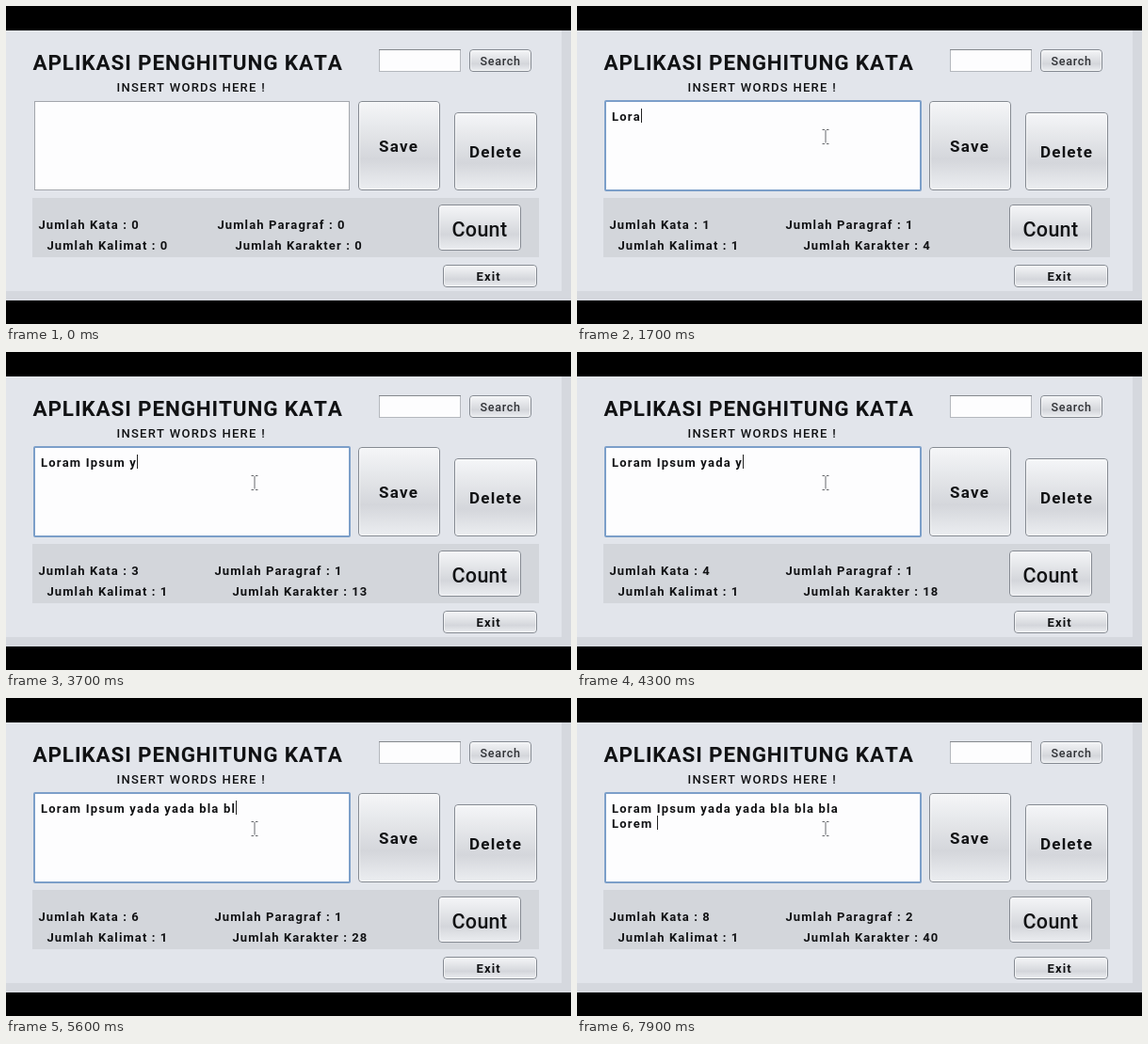
These frames come from a looping animation (600x338 px, 8 s). An HTML page:

```html
<!DOCTYPE html>
<html lang="id">
<head>
<meta charset="utf-8">
<title>Aplikasi Penghitung Kata</title>
<style>
  html, body { margin: 0; height: 100%; overflow: hidden; background: #000; }
  svg { display: block; width: 100vw; height: 100vh; }
  text {
    font: 700 13px Roboto, "Open Sans", sans-serif;
    font-kerning: none;
    letter-spacing: 1.1px;
    fill: #111214;
  }
  .title { font-size: 22.5px; letter-spacing: .85px; }
  .hint { font-weight: 500; letter-spacing: 1.27px; }
  .search { font-size: 12.5px; font-weight: 500; letter-spacing: .7px; fill: #303236; }
  .big { font-size: 17px; letter-spacing: 1.2px; }
  .count { font-size: 21.5px; font-weight: 500; letter-spacing: .3px; }
  .typed { letter-spacing: 1.18px; }
  .button { fill: url(#face); stroke: #858a92; }
  .shade { fill: none; stroke: #fff; stroke-opacity: .55; }
</style>
</head>
<body>
<svg viewBox="0 0 600 338" preserveAspectRatio="none">
  <defs>
    <linearGradient id="face" x2="0" y2="1">
      <stop offset="0" stop-color="#f5f6f8"/>
      <stop offset=".5" stop-color="#dcdee2"/>
      <stop offset=".65" stop-color="#d4d6db"/>
      <stop offset="1" stop-color="#eceef1"/>
    </linearGradient>
  </defs>

  <path fill="#d5d8de" d="M0 26H600V313H0z"/>
  <path fill="#e2e5eb" d="M0 26H590V303H0z"/>
  <path fill="#d3d6db" d="M28 204H566V267H28z"/>

  <text class="title" x="28.5" y="67.5">APLIKASI PENGHITUNG KATA</text>
  <text class="hint" x="117.5" y="91">INSERT WORDS HERE !</text>

  <rect x="396.5" y="46.5" width="86" height="23" fill="#fdfdfe" stroke="#b4b7bd"/>
  <path stroke="#85888d" d="M396 46.5H483"/>

  <g id="buttons"></g>
  <text class="search" x="503.5" y="63">Search</text>
  <text class="big" x="396" y="155">Save</text>
  <text class="big" x="492" y="160.5">Delete</text>
  <text class="count" x="473.5" y="244.5">Count</text>
  <text x="499.5" y="292">Exit</text>

  <rect x="30.5" y="101.5" width="334" height="94" fill="#fdfdfe" stroke="#a3a6ac"/>
  <rect id="focus" x="30" y="101" width="335" height="95" rx="1" fill="none" stroke="#7c9fc9" stroke-width="2"/>
  <text class="typed" x="37" y="121.5" xml:space="preserve"></text>
  <text class="typed" x="37" y="137.5" xml:space="preserve"></text>
  <path id="caret" stroke="#222" d="M.5 0V15"/>
  <path id="pointer" fill="none" stroke="#66686c" d="M260.5 131.5H263M265 131.5H267.5M264 132V145.5M260.5 146.5H263M265 146.5H267.5"/>

  <text id="words" x="34.5" y="237"></text>
  <text id="paragraphs" y="237"></text>
  <text id="sentences" x="43.5" y="259"></text>
  <text id="characters" y="259"></text>
</svg>
<script>
  const LOOP = 8000, BLINK = 500, FOCUS_AT = 400, POINTER_AT = 200;
  const MESSAGE = "Loram Ipsum yada yada bla bla bla\nLorem ";
  // Moment of each keystroke, in tenths of a second
  const KEYS = [13, 14, 16, 17, 18, 20, 24, 26, 28, 30, 32, 34, 36, 38, 39, 40, 41, 43, 44, 45,
    46, 47, 48, 49, 50, 52, 53, 55, 57, 58, 59, 60, 61, 64, 71, 72, 74, 75, 76, 78];
  const BUTTONS = [[492, 46, 66, 24], [374, 101, 87, 95], [476, 113, 88, 83], [459, 211, 88, 49], [464, 275, 100, 24]];

  const $ = id => document.getElementById(id);
  const lineNodes = document.querySelectorAll(".typed");
  const show = (id, on) => $(id).setAttribute("visibility", on ? "visible" : "hidden");

  $("buttons").innerHTML = BUTTONS.map(([x, y, w, h]) =>
    `<rect class="button" x="${x + .5}" y="${y + .5}" width="${w - 1}" height="${h - 1}" rx="3.5"/>
     <rect class="shade" x="${x + 1.5}" y="${y + 1.5}" width="${w - 3}" height="${h - 3}" rx="2.5"/>`).join("");

  function setText(node, value) {
    if (node.textContent !== value) node.textContent = value;
  }

  function render(time) {
    const typed = KEYS.filter(k => k * 100 <= time).length;
    const text = MESSAGE.slice(0, typed);
    const lines = text.split("\n");
    lineNodes.forEach((node, i) => setText(node, lines[i] || ""));

    const started = typed > 0;
    const words = text.split(/\s+/).filter(Boolean).length;
    const paragraphs = lines.filter(Boolean).length;
    setText($("words"), `Jumlah Kata : ${words}`);
    setText($("paragraphs"), `Jumlah Paragraf : ${paragraphs}`);
    setText($("sentences"), `Jumlah Kalimat : ${started ? 1 : 0}`);
    setText($("characters"), `Jumlah Karakter : ${typed}`);
    $("paragraphs").setAttribute("x", started ? 221.5 : 224.5);
    $("characters").setAttribute("x", started ? 240.5 : 243.5);

    const row = lines.length - 1;
    const width = lines[row] ? lineNodes[row].getComputedTextLength() : 0;
    const sinceKey = time - (started ? KEYS[typed - 1] * 100 : FOCUS_AT);
    $("caret").setAttribute("transform", `translate(${Math.round(37.4 + width)} ${109 + row * 16})`);
    show("caret", sinceKey >= 0 && Math.floor(sinceKey / BLINK) % 2 === 0);
    show("focus", time >= FOCUS_AT);
    show("pointer", time >= POINTER_AT);
  }

  const start = performance.now();
  function tick() {
    render((performance.now() - start) % LOOP);
    requestAnimationFrame(tick);
  }
  tick();
</script>
</body>
</html>
```
